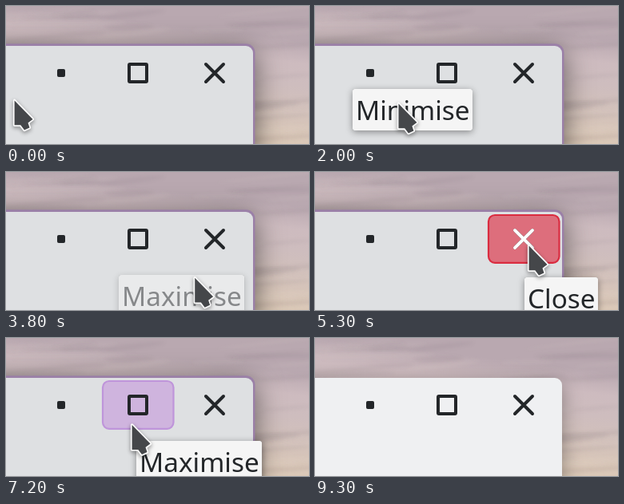
These frames come from a looping animation (379 by 173 pixels, 9600 ms). An HTML page with a canvas:

```html
<!DOCTYPE html>
<html lang="en">
<head>
<meta charset="utf-8">
<title>Window buttons</title>
<style>
  html, body { margin: 0; overflow: hidden; }
  canvas { display: block; }
</style>
</head>
<body>
<canvas id="stage" width="379" height="173"></canvas>
<script>
const W = 379, H = 173, LOOP = 9600, STEP = 100;
const INK = '#232629', TIP_FONT = '33.33px "Noto Sans", sans-serif';
const ctx = document.getElementById('stage').getContext('2d');

// Pointer moves: each eases to (x, y), sagging below the straight line
const moves = [
  { start: 0, end: 1, x: 10, y: 117, sag: 0 },
  { start: 350, end: 900, x: 43, y: 82, sag: 0 },
  { start: 1400, end: 2400, x: 137, y: 116, sag: 19 },
  { start: 2600, end: 2700, x: 137, y: 107, sag: 0 },
  { start: 3300, end: 4035, x: 267, y: 91, sag: 53 },
  { start: 5300, end: 6100, x: 159, y: 107, sag: 20 },
  { start: 7150, end: 8000, x: -40, y: 130, sag: 12 }
];
const tips = [
  { text: 'Minimise', x: 47, y: 104, from: 1250, until: 2050 },
  { text: 'Maximise', x: 141, y: 129, from: 2680, until: 3650 },
  { text: 'Close', x: 262, y: 132, from: 4250, until: 5400 },
  { text: 'Maximise', x: 163, y: 129, from: 6200, until: 7300 }
];
const PURPLE = { fill: '#cfb4de', edge: '#bf95da' };
const RED = { fill: '#dd6e7c', edge: '#da2c40' };

const ramp = (t, a, b) => Math.min(1, Math.max(0, (t - a) / (b - a)));
const ease = k => k * k * (3 - 2 * k);

function pointerAt(t) {
  const i = Math.max(1, moves.findLastIndex(m => m.start <= t));
  const a = moves[i - 1], b = moves[i];
  const k = ease(ramp(t, b.start, b.end));
  return {
    x: a.x + (b.x - a.x) * k,
    y: a.y + (b.y - a.y) * k + b.sag * Math.sin(Math.PI * k)
  };
}

// Share of the last 120 ms that the pointer spent on the button
function hover(left, t) {
  const samples = 12;
  let hits = 0;
  for (let i = 0; i < samples; i++) {
    const { x, y } = pointerAt(t - i * 10);
    if (x > left && x < left + 90 && y > 53 && y < 114) hits++;
  }
  return hits / samples;
}

function roundBox(x, y, w, h, r) {
  const box = new Path2D();
  box.roundRect(x, y, w, h, r);
  return box;
}

function shadow(color, blur, dy) {
  ctx.shadowColor = color;
  ctx.shadowBlur = blur;
  ctx.shadowOffsetY = dy;
}

function makeSky() {
  const sky = document.createElement('canvas');
  sky.width = W;
  sky.height = H;
  const c = sky.getContext('2d');
  const g = c.createLinearGradient(0, 0, -20, H);
  ['#b9a8b0', '#cdbbbf', '#cebdbe', '#d2c1bb', '#d8c6b8', '#dbc7b2', '#d6c1a6']
    .forEach((color, i, all) => g.addColorStop(i / (all.length - 1), color));
  c.fillStyle = g;
  c.fillRect(0, 0, W, H);
  let seed = 7;
  const rnd = () => (seed = seed * 16807 % 2147483647) / 2147483647;
  c.filter = 'blur(2px)';
  for (let i = 0; i < 70; i++) {
    c.fillStyle = rnd() < .5 ? 'rgba(90,72,84,.07)' : 'rgba(244,228,216,.09)';
    c.beginPath();
    c.ellipse(rnd() * W, rnd() * H, 25 + rnd() * 70, 1 + rnd() * 3, -rnd() * .12, 0, 7);
    c.fill();
  }
  return sky;
}
const sky = makeSky();

function drawFrame(active) {
  const body = roundBox(-80, 50, 389, 300, 9);
  ctx.save();
  shadow(`rgba(0,0,0,${.35 + .25 * active})`, 24 + 12 * active, 6);
  ctx.fillStyle = '#eff0f2';
  ctx.fill(body);
  shadow('transparent', 0, 0);
  ctx.globalAlpha = active;
  ctx.fillStyle = '#9b80a8';
  ctx.fill(roundBox(-80, 47.3, 391.5, 300, 11));
  ctx.globalAlpha = active && 1;
  ctx.fillStyle = `color-mix(in srgb, #dee0e2 ${active * 100}%, #eff0f2)`;
  ctx.fill(body);
  ctx.restore();
}

function drawHighlight(left, { fill, edge }, alpha) {
  const box = roundBox(left + 1, 54, 88.5, 59.8, 8);
  ctx.globalAlpha = alpha;
  ctx.fillStyle = fill;
  ctx.strokeStyle = edge;
  ctx.lineWidth = 2.2;
  ctx.fill(box);
  ctx.stroke(box);
  ctx.globalAlpha = 1;
}

function drawButtons(t) {
  const closeHover = hover(216, t);
  drawHighlight(24, PURPLE, hover(24, t));
  drawHighlight(120, PURPLE, hover(120, t));
  drawHighlight(216, RED, closeHover);

  ctx.fillStyle = ctx.strokeStyle = INK;
  ctx.lineWidth = 4;
  ctx.lineCap = 'round';
  ctx.fill(roundBox(64, 79, 10, 10, 2));
  ctx.stroke(roundBox(154, 73, 22, 22, 1));
  const cross = new Path2D('M250 73l22 22M272 73l-22 22');
  ctx.stroke(cross);
  ctx.globalAlpha = closeHover;
  ctx.strokeStyle = '#fff';
  ctx.stroke(cross);
  ctx.globalAlpha = 1;
}

function drawTip({ text, x, y, from, until }, t) {
  const alpha = ramp(t, from, from + 120) * (1 - ramp(t, until, until + 300));
  if (!alpha) return;
  ctx.save();
  ctx.globalAlpha = alpha;
  ctx.font = TIP_FONT;
  const box = roundBox(x, y, ctx.measureText(text).width + 7.4, 52, 3);

  // Keep the shadow outside, so that it does not show through while fading
  ctx.save();
  const outside = new Path2D(box);
  outside.rect(0, 0, W, H);
  ctx.clip(outside, 'evenodd');
  shadow('rgba(0,0,0,.4)', 8, 2);
  ctx.fill(box);
  ctx.restore();

  ctx.fillStyle = '#f5f5f5';
  ctx.fill(box);
  ctx.fillStyle = INK;
  ctx.fillText(text, x + 4, y + 39);
  ctx.restore();
}

const arrow = new Path2D('M.6 1.4V32.3H8.3L13 38.5L19.5 35.5L17.5 29.5L23.5 25Z');

function drawPointer(t) {
  const { x, y } = pointerAt(t);
  ctx.save();
  ctx.translate(x, y);
  ctx.lineJoin = 'round';
  ctx.lineWidth = 3.4;
  ctx.strokeStyle = '#fcfcfc';
  shadow('rgba(0,0,0,.45)', 5, 2);
  ctx.stroke(arrow);
  shadow('transparent', 0, 0);
  ctx.fillStyle = '#45474a';
  ctx.fill(arrow);
  ctx.restore();
}

function draw(now) {
  const t = Math.floor(now % LOOP / STEP) * STEP;
  ctx.drawImage(sky, 0, 0);
  drawFrame(1 - ramp(t, 9100, 9300));
  drawButtons(t);
  tips.forEach(tip => drawTip(tip, t));
  drawPointer(t);
}

const start = performance.now();
function tick() {
  draw(performance.now() - start);
  requestAnimationFrame(tick);
}
tick();
</script>
</body>
</html>
```
